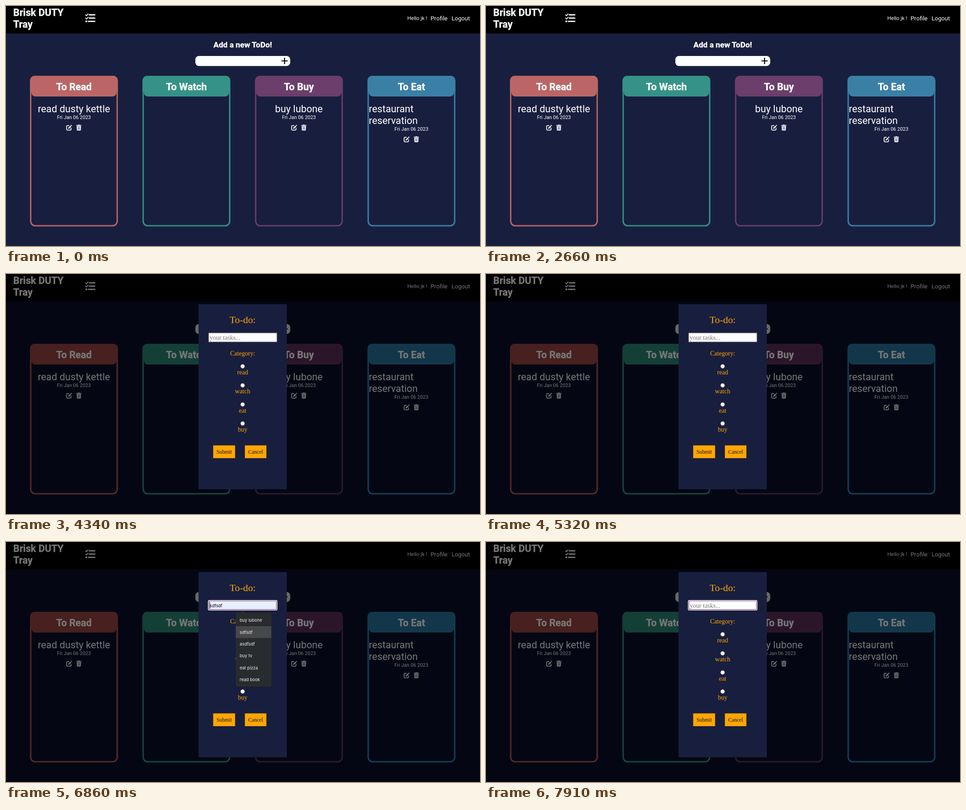
These frames come from a looping animation (1050 by 533 pixels, 8000 ms). An HTML page:

```html
<!DOCTYPE html>
<html lang="en">
<head>
<meta charset="utf-8">
<title>To-do board</title>
<style>
html, body { margin: 0; width: 100%; height: 100%; overflow: hidden; background: #181f3e; }
svg { display: block; width: 100vw; height: 100vh; }
text { white-space: pre; }
#page {
  --bg: #181f3e; --ink: #fff; --box: #fff; --plus: #000;
  --read: #bc6566; --watch: #359287; --buy: #6b3e6b; --eat: #3a80a6;
  --readLine: #bc6566; --watchLine: #359287; --buyLine: #6b3e6b; --eatLine: #3a80a6;
  font-family: Roboto, "Liberation Sans", sans-serif;
  fill: var(--ink);
}
#page.dim {
  --bg: #040713; --ink: #777; --box: #686868; --plus: #000;
  --read: #47201f; --watch: #143f37; --buy: #2b1629; --eat: #13374a;
  --readLine: #5a2a29; --watchLine: #16483d; --buyLine: #2e1a2e; --eatLine: #15405a;
}
.bold { font-weight: 700; stroke: var(--ink); stroke-width: .35px; }
.mid { text-anchor: middle; }
.line { fill: none; stroke: var(--ink); }
#modal { font-family: "Liberation Serif", "Times New Roman", serif; fill: #ffa500; }
#popup, #preview { font: 9.4px Inter, "Liberation Sans", sans-serif; }
</style>
</head>
<body>
<svg viewBox="0 0 1050 533" preserveAspectRatio="none">
  <g id="page"></g>
  <g id="modal"></g>
</svg>
<script>
const LOOP = 8000;
const options = ['buy lubone', 'sdfsdf', 'asdfsdf', 'buy tv', 'eat pizza', 'read book'];
const ROW = 26.3, ROW_TOP = 161;

// Each step holds until the next; only changed fields are listed.
const steps = [
  [0, { modal: 0, focus: 0, popup: 0, caret: 0, hover: -1 }],
  [4340, { modal: 1 }],
  [6020, { focus: 1, caret: 1 }],
  [6090, { popup: 1 }],
  [6160, { hover: 0 }],
  [6230, { hover: 1 }],
  [6300, { hover: 2 }],
  [6370, { hover: 3 }],
  [6790, { hover: 2 }],
  [6860, { hover: 1 }],
  [7070, { hover: 0 }],
  [7140, { hover: -1, caret: 0 }],
  [7490, { popup: 0, caret: 1 }],
  [7910, { caret: 0 }]
];

const $ = id => document.getElementById(id);
const text = (x, y, size, str, cls = '', extra = '') =>
  `<text x="${x}" y="${y}" font-size="${size}" class="${cls}" ${extra}>${str}</text>`;
const rect = (x, y, w, h, r, fill, extra = '') =>
  `<rect x="${x}" y="${y}" width="${w}" height="${h}" rx="${r}" fill="${fill}" ${extra}/>`;
const path = (d, extra = '') => `<path d="${d}" ${extra}/>`;

function icons(cx, y) {
  const edit = path('M6 2H2.6Q1 2 1 3.6V10.4Q1 12 2.6 12H9.2Q10.8 12 10.8 10.4V7.4', 'class="line" stroke-width="1.7" stroke-linecap="round"') +
    path('M4.2 9.2L4.8 6.6L9.2 2.2L11.2 4.2L6.8 8.6ZM9.9 1.5L10.7 .7Q11.3 .2 11.9 .7L12.7 1.5Q13.2 2.1 12.7 2.7L11.9 3.5Z');
  const bin = path('M0 1.2H3.2L4 .2H7.4L8.2 1.2H11.4V2.7H0Z') +
    path('M.8 3.5H10.6L10 12Q9.9 13.2 8.8 13.2H2.6Q1.5 13.2 1.4 12Z') +
    path('M3.7 5.2V11.4M5.7 5.2V11.4M7.7 5.2V11.4', 'fill="none" stroke="var(--bg)" stroke-width=".8"');
  return `<g transform="translate(${cx - 17.2} ${y})">${edit}</g>` +
    `<g transform="translate(${cx + 5.2} ${y - .4})">${bin}</g>`;
}

function column(i, key, title, lines) {
  const x = 53.2 + i * 249.2, cx = x + 97.3;
  const last = 235.7 + 26 * (lines.length - 1);
  let out = rect(x + 1.5, 156.5, 191.6, 331.6, 10, 'none', `stroke="var(--${key}Line)" stroke-width="3"`) +
    path(`M${x} 190V167Q${x} 155 ${x + 12} 155H${x + 182.6}Q${x + 194.6} 155 ${x + 194.6} 167V190H${x + 191.6}Q${x + 191.6} 201 ${x + 181.6} 201H${x + 13}Q${x + 3} 201 ${x + 3} 190Z`, `fill="var(--${key})"`) +
    text(cx, 187.2, 21.8, title, 'bold mid');
  lines.forEach((str, n) => {
    const wide = lines.length > 1;
    out += text(wide ? x + 3 : cx, 235.7 + 26 * n, 21.8, str, wide ? '' : 'mid');
  });
  if (lines.length) out += text(cx, last + 15.7, 10.9, 'Fri Jan 06 2023', 'mid') + icons(cx, last + 27.9);
  return out;
}

$('page').innerHTML =
  rect(0, 0, 1050, 533, 0, 'var(--bg)') +
  rect(0, 0, 1050, 61, 0, '#000') +
  text(16, 21.7, 21.8, 'Brisk DUTY', 'bold') +
  text(16, 47.7, 21.8, 'Tray', 'bold') +
  path('M184.5 19.6H196.7M184.5 26.9H196.7M182.5 34.1H196.7', 'class="line" stroke-width="2.8" stroke-linecap="round"') +
  path('M176.4 19.7L178.4 21.6L181.8 17.7M176.4 27L178.4 28.9L181.8 25', 'class="line" stroke-width="1.9" stroke-linecap="round" stroke-linejoin="round"') +
  '<circle cx="177.9" cy="34.1" r="2.1"/>' +
  text(889, 31, 11.6, 'Hello jk !') +
  text(940.6, 31.5, 13.1, 'Profile') +
  text(987, 31.5, 13.1, 'Logout') +
  text(524.4, 92.2, 17.4, 'Add a new ToDo!', 'bold mid') +
  rect(419.4, 111, 210.2, 22.3, 8, 'var(--box)') +
  path('M610.2 122H624M617.1 115.1V128.9', 'stroke="var(--plus)" stroke-width="2.2"') +
  column(0, 'read', 'To Read', ['read dusty kettle']) +
  column(1, 'watch', 'To Watch', []) +
  column(2, 'buy', 'To Buy', ['buy lubone']) +
  column(3, 'eat', 'To Eat', ['restaurant', 'reservation']);

const radios = ['read', 'watch', 'eat', 'buy'].map((name, i) => {
  const y = 205 + i * 42.35;
  return `<circle cx="524.2" cy="${y}" r="4.5" fill="#fff" stroke="#767676" stroke-width=".8"/>` +
    text(524.2, y + 17.9, 14.1, name, 'mid');
}).join('');

const button = (x, w, label) => rect(x, 380.6, w, 28.4, 0, '#ffa500') +
  text(x + w / 2, 398.7, 11.8, label, 'mid', 'fill="#111"');

$('modal').innerHTML =
  rect(426.5, 67, 195.5, 411, 0, '#181f3e') +
  text(524.2, 108.6, 21.8, 'To-do:', 'mid') +
  rect(449, 131, 151, 19.8, 0, '#fff', 'stroke="#858585" stroke-width="1"') +
  `<g id="focus">${rect(447.4, 129, 153.8, 23, 3, '#fff')}
    ${rect(449.4, 131, 149.8, 19.2, 1, '#fff', 'id="field" stroke="#763a78" stroke-width="1.2"')}</g>` +
  text(451.2, 145.6, 14.1, 'your tasks...', '', 'id="hint" fill="#757575"') +
  '<text id="preview" x="451.2" y="145" fill="#000"></text>' +
  path('M451.7 133.5V148', 'id="caret" stroke="#111" stroke-width="1"') +
  text(524.2, 180.6, 14.1, 'Category:', 'mid') +
  radios + button(459, 48.5, 'Submit') + button(529.2, 47.6, 'Cancel') +
  `<g id="popup">
    ${path('M518 158L525 151.6L532 158Z', 'fill="#292c2e"')}
    ${rect(509, 157.3, 79, 164.2, 2, '#292c2e', 'stroke="#1d2023" stroke-width=".5"')}
    ${rect(509, 0, 78.8, ROW, 0, '#46484a', 'id="mark"')}
    ${options.map((str, i) => text(517.8, ROW_TOP + ROW * (i + .5) + 3.2, 9.4, str, '', 'fill="#f1f1f1"')).join('')}
  </g>`;

const show = (id, on) => { $(id).style.display = on ? '' : 'none'; };

function draw(t) {
  const s = {};
  for (const [at, change] of steps) if (t >= at) Object.assign(s, change);
  const picked = s.hover >= 0;
  $('page').classList.toggle('dim', !!s.modal);
  show('modal', s.modal);
  show('focus', s.focus);
  show('popup', s.popup);
  show('caret', s.caret);
  show('mark', picked);
  show('hint', !picked);
  $('mark').setAttribute('y', ROW_TOP + ROW * Math.max(0, s.hover) - .3);
  $('field').setAttribute('fill', picked ? '#e8f0fe' : '#fff');
  $('preview').textContent = picked ? options[s.hover] : '';
}

const start = performance.now();
function tick() {
  draw((performance.now() - start) % LOOP);
  requestAnimationFrame(tick);
}
tick();
</script>
</body>
</html>
```
